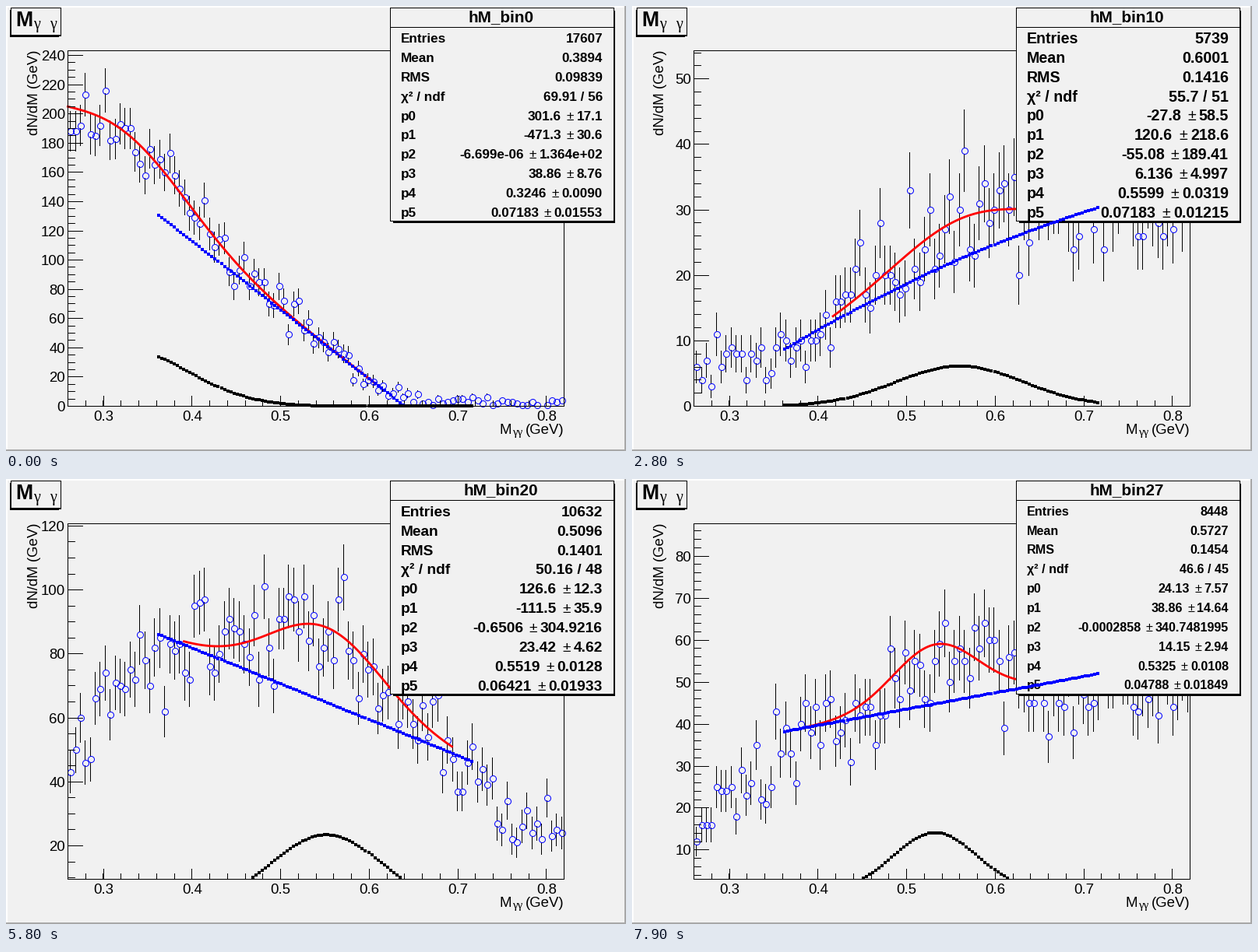
Write a matplotlib script that moves like this. It is 796 by 572 pixels and loops after 8000 ms.

```python
import math
import numpy as np
import matplotlib.pyplot as plt
from matplotlib.animation import FuncAnimation
from matplotlib.patches import Rectangle

plt.rcParams["path.snap"] = False  # line centres below already sit on pixels

W, H, DPI = 796, 572, 64
PT = 72 / DPI                      # points per pixel
LEFT, RIGHT, TOP, BOTTOM = 79.5, 716.5, 57.5, 514.5
X0, X1, BINS = 0.26, 0.82, 100
STEP = (X1 - X0) / BINS
CENTERS = X0 + STEP * (np.arange(BINS) + 0.5)
BG, BLUE, RED, BLACK = "#f1f1f1", "#0000ff", "#ff0000", "#000000"
SANS, SERIF = "Liberation Sans", "Liberation Serif"
DATA, FIT, AXES, BOX, TEXT, PARTS = range(1, 7)

plots = {}


def add_plot(number, **parts):
    plots[number] = {name: np.array(v, float) for name, v in parts.items()}


# stats: entries, mean, rms, chi2, ndf; params: parabola, then Gaussian peak;
# edges: mean count at both ends of the x axis
add_plot(0, stats=(17607, .3894, .09839, 69.91, 56),
         params=(301.6, -471.3, -6.699e-6, 38.86, .3246, .07183),
         errors=(17.1, 30.6, 136.4, 8.76, .009, .01553),
         start=.26, limits=(0, 243.2), edges=(205, 1.5))
add_plot(6, stats=(19973, .438, .1181, 89.42, 68),
         params=(185.2, 171.9, -594.2, 39.18, .4383, .07183),
         errors=(41.8, 194.5, 202.5, 6.83, .0098, .00383),
         start=.26, limits=(0, 246.5), edges=(190, 6))
add_plot(10, stats=(5739, .6001, .1416, 55.7, 51),
         params=(-27.8, 120.6, -55.08, 6.136, .5599, .07183),
         errors=(58.5, 218.6, 189.41, 4.997, .0319, .01215),
         start=.417, limits=(0, 54.3), edges=(5, 30))
add_plot(14, stats=(11412, .5804, .1471, 68.78, 71),
         params=(-6.793, 164.8, -68.06, 12.68, .58, .07183),
         errors=(40.97, 157, 136.26, 5.68, .02, .02388),
         start=.3612, limits=(11.72, 114), edges=(24, 72))
add_plot(20, stats=(10632, .5096, .1401, 50.16, 48),
         params=(126.6, -111.5, -.6506, 23.42, .5519, .06421),
         errors=(12.3, 35.9, 304.9216, 4.62, .0128, .01933),
         start=.391, limits=(9.54, 120.7), edges=(50, 22))
add_plot(24, stats=(21065, .4416, .1207, 77.4, 63),
         params=(227.3, 56.98, -499.2, 27.52, .472, .07183),
         errors=(65.9, 284.83, 279.3, 9.05, .017, .01632),
         start=.306, limits=(0, 259.7), edges=(195, 9))
add_plot(27, stats=(8448, .5727, .1454, 46.6, 45),
         params=(24.13, 38.86, -.0002858, 14.15, .5325, .04788),
         errors=(7.57, 14.64, 340.7481995, 2.94, .0108, .01849),
         start=.386, limits=(3.05, 87.7), edges=(14, 50))


def parabola(x, p):
    return p[0] + p[1] * x + p[2] * x * x


def peak(x, p):
    return p[3] * np.exp(-0.5 * ((x - p[4]) / p[5]) ** 2)


def fit(x, p):
    return parabola(x, p) + peak(x, p)


def mean_counts(p, start, end, edges):
    """The fit, with a straight rise before it and a decay after it."""
    rise = np.interp(CENTERS, (X0, start + 1e-9), (edges[0], fit(start, p)))
    decay = edges[1] + (fit(end, p) - edges[1]) * np.exp((end - CENTERS) / .05)
    return np.where(CENTERS < start, rise,
                    np.where(CENTERS > end, decay, fit(CENTERS, p)))


def plot_state(number):
    """Known plots as given, the ones between blended from their neighbours."""
    before = max(k for k in plots if k <= number)
    after = min(k for k in plots if k >= number)
    t = (number - before) / max(after - before, 1)
    a, b = plots[before], plots[after]
    state = {name: a[name] + (b[name] - a[name]) * t for name in a}
    state["end"] = state["start"] + (round(state["stats"][4]) + 6) * STEP
    mean = mean_counts(state["params"], state["start"], state["end"],
                       state["edges"])
    noise = np.random.default_rng(number + 40).normal(0, 1, BINS)
    state["counts"] = np.round(mean + np.sqrt(mean) * noise.clip(-1.8, 2))
    return state


fig = plt.figure(figsize=(W / DPI, H / DPI), dpi=DPI, facecolor=BG)
ax = fig.add_axes([0, 0, 1, 1])


def to_x(x):
    return LEFT + (x - X0) / (X1 - X0) * (RIGHT - LEFT)


def to_y(v, limits):
    return BOTTOM - (v - limits[0]) / (limits[1] - limits[0]) * (BOTTOM - TOP)


def put(x, y, s, size, bold=False, font=SANS, **kw):
    return ax.text(x, y, s, fontsize=size * PT, family=font, zorder=TEXT,
                   va="baseline", weight="bold" if bold else "normal", **kw)


def put_before(artist, y, s, size, gap, bold=False):
    """Text that ends a gap to the left of another text."""
    return ax.annotate(s, (0, y), xycoords=(artist, "data"),
                       xytext=(-gap * PT, 0), textcoords="offset points",
                       ha="right", va="baseline", fontsize=size * PT,
                       family=SANS, weight="bold" if bold else "normal",
                       zorder=TEXT)


def block(x, y, w, h, color, z=0):
    ax.add_patch(Rectangle((x, y), w, h, fc=color, lw=0, zorder=z, aa=False))


def outline(x, y, w, h, fill, z):
    ax.add_patch(Rectangle((x, y), w, h, fc=fill, ec=BLACK, lw=PT, zorder=z,
                           aa=False))


def hline(y, x0, x1, z=AXES):
    ax.hlines(np.floor(y) + .5, x0, x1, colors=BLACK, lw=PT, zorder=z,
              antialiased=False)


def vline(x, y0, y1, z=AXES):
    ax.vlines(np.floor(x) + .5, y0, y1, colors=BLACK, lw=PT, zorder=z,
              antialiased=False)


def nice(width):
    power = 10 ** math.floor(math.log10(width) + 1e-9)
    digit = width / power
    for bound, rounded in ((1.001, 1), (2.5, 2), (5, 5)):
        if digit <= bound:
            return rounded * power
    return 10 * power


def ticks(step, lo, hi):
    return np.arange(math.ceil(lo / step - 1e-6),
                     math.floor(hi / step + 1e-6) + 1) * step


def draw_axes(limits):
    outline(LEFT, TOP, RIGHT - LEFT, BOTTOM - TOP, "none", AXES)
    step = nice((limits[1] - limits[0]) / 10)
    hline(to_y(ticks(step, *limits), limits), LEFT, LEFT + 19)
    hline(to_y(ticks(nice(step / 5), *limits), limits), LEFT, LEFT + 9.5)
    for v in ticks(step, *limits):
        put(76, to_y(v, limits) + 6.5, f"{v:g}", 18.6, ha="right")
    vline(to_x(ticks(.1, X0, X1)), BOTTOM - 13.5, BOTTOM)
    vline(to_x(ticks(.02, X0, X1)), BOTTOM - 7, BOTTOM)
    for v in ticks(.1, X0, X1):
        put(to_x(v), 533, f"{v:.1f}", 18.6, ha="center")
    put(41, 166, "dN/dM (GeV)", 18.6, rotation=90, rotation_mode="anchor")
    put(633.5, 550.5, "M", 18.6)
    put(650, 552, "γγ", 15, font=SERIF)
    put(717, 550.5, "(GeV)", 18.6, ha="right")


def draw_points(counts, limits):
    shown = (counts > 0) & (counts > limits[0]) & (counts < limits[1])
    x, n = to_x(CENTERS[shown]), counts[shown]
    y, radius = to_y(n, limits), 4
    for sign in (-1, 1):
        end = to_y(np.clip(n + sign * np.sqrt(n), *limits), limits)
        long = np.abs(end - y) > radius
        vline(x[long], y[long] - sign * radius, end[long], DATA)
    ax.plot(np.floor(x) + .5, y, "o", ms=8 * PT, mfc="none", mec=BLUE, mew=PT,
            zorder=DATA)


def draw_curves(state):
    p, limits = state["params"], state["limits"]

    def curve(f, x, style, **kw):
        v = f(x, p)
        v = np.where((v >= limits[0]) & (v <= limits[1]), v, np.nan)
        ax.plot(to_x(x), to_y(v, limits), style, **kw)

    curve(fit, np.linspace(state["start"], state["end"], 100), "-", color=RED,
          lw=2.8 * PT, zorder=FIT)
    for part, color in ((parabola, BLUE), (peak, BLACK)):
        curve(part, np.linspace(.3625, .716, 101), "s", color=color,
              ms=3.4 * PT, mew=0, zorder=PARTS)


def value_and_error(value, error):
    text = f"{value:.4g}"
    if "e" in text:
        return text, f"{error:.3e}"
    return text, f"{error:.{len(text.partition('.')[2])}f}"


def draw_stats(number, state):
    block(497, 277, 285, 2, BLACK, BOX)
    block(780, 6, 2, 273, BLACK, BOX)
    outline(493.5, 2.5, 287, 274, BG, BOX)
    hline(27, 493.5, 780.5, BOX)
    put(635.5, 20.5, f"hM_bin{number}", 20.6, True, ha="center")

    entries, mean, rms, chi2, ndf = state["stats"]
    rows = [("Entries", f"{entries:.0f}"), ("Mean", f"{mean:.4g}"),
            ("RMS", f"{rms:.4g}"), ("χ² / ndf", f"{chi2:.4g} / {ndf:.0f}")]
    pairs = [value_and_error(*pair)
             for pair in zip(state["params"], state["errors"])]
    longest = max(len(v) + len(e) + 3 for v, e in pairs)
    size = 19.6 - .5 * max(0, longest - 17)
    baselines = 41 + 24.85 * np.arange(10) + .36 * size
    for y, (label, text) in zip(baselines, rows):
        put(507, y, label, size, True)
        put(766, y, text, size, True, ha="right")
    for i, (y, (value, error)) in enumerate(zip(baselines[4:], pairs)):
        put(507, y, f"p{i}", size, True)
        right = put(766, y, error, size, True, ha="right")
        sign = put_before(right, y, "±", size, size * .2)
        put_before(sign, y, value, size, size * .4, True)


def draw_canvas():
    block(0, 0, W, H, BG)
    block(0, 0, W, 2, "#ffffff")
    block(0, 0, 2, H, "#ffffff")
    block(0, H - 2, W, 2, "#a8a8a8")
    block(W - 2, 0, 2, H, "#a8a8a8")
    block(5, 5, 2, 35, BLACK, BOX)
    block(5, 38, 63, 2, BLACK, BOX)
    outline(6.5, 2.5, 64, 35.5, BG, BOX)
    put(12, 26, "M", 26.6, True)
    for x in (35, 56):
        put(x, 29, "γ", 20, font=SERIF)


def update(frame):
    number = (frame + 2) // 3
    state = plot_state(number)
    ax.clear()
    ax.set(xlim=(0, W), ylim=(H, 0))
    ax.axis("off")
    draw_canvas()
    draw_points(state["counts"], state["limits"])
    draw_curves(state)
    draw_axes(state["limits"])
    draw_stats(number, state)
    return []


anim = FuncAnimation(fig, update, frames=80, interval=100, repeat=True,
                     repeat_delay=0, init_func=lambda: [], blit=False)
plt.show()
```
